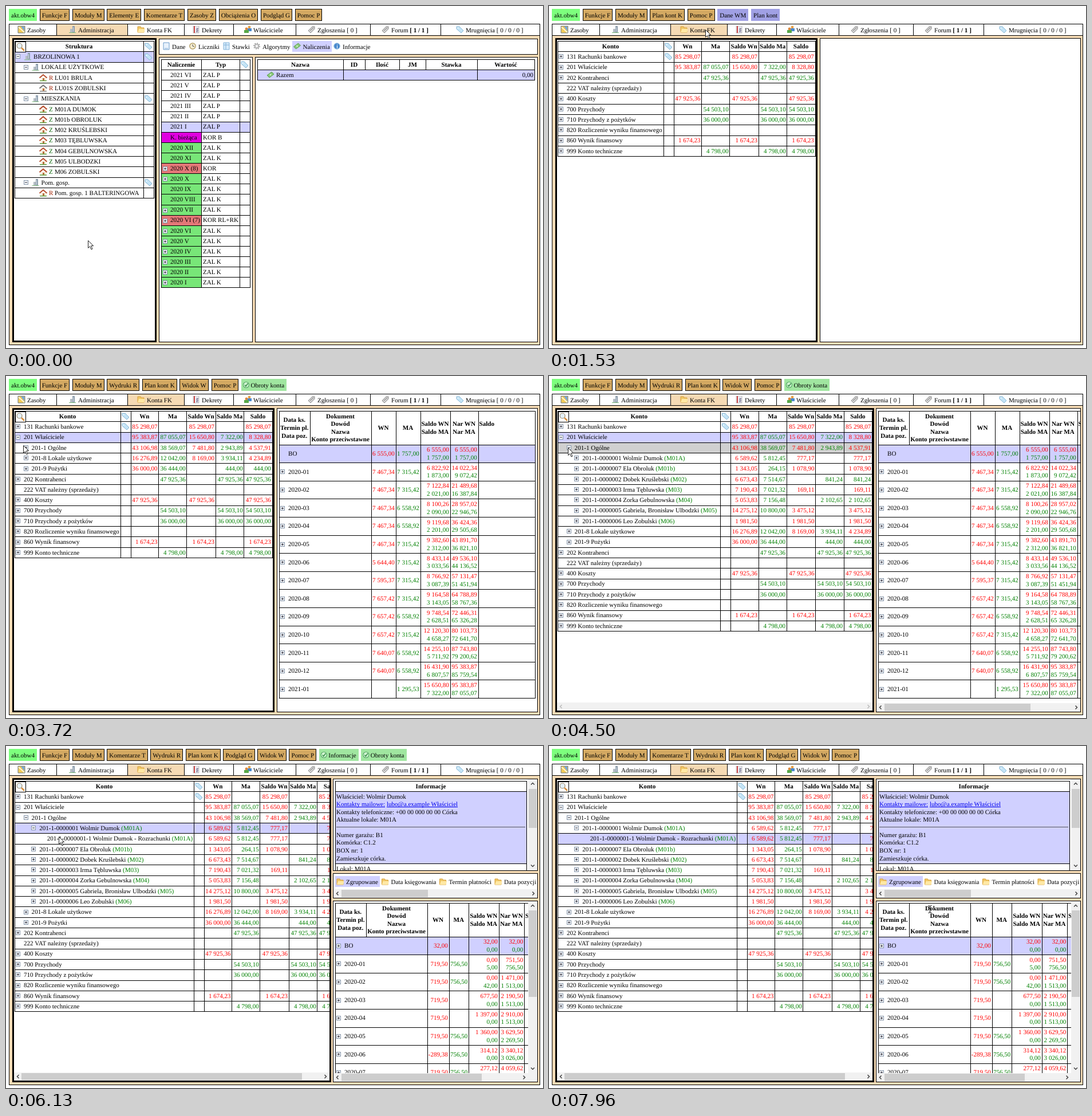
An HTML page with a canvas that plays this animation: 938x597 px, repeating every 8000 ms.

```html
<!DOCTYPE html>
<html lang="pl">
<head>
<meta charset="utf-8">
<title>Administracja</title>
<style>
html, body { margin: 0; width: 100%; height: 100%; overflow: hidden; background: #fff; }
canvas { display: block; }
</style>
</head>
<body>
<canvas width="938" height="597"></canvas>
<script>
const g = document.querySelector('canvas').getContext('2d');
const PEACH = '#f5dab4', TAN = '#d4a962', LILAC = '#d0d0ff', GRAY = '#d0d0d0';
const RED = '#f00', GREEN = '#008000';
const ROW = 18.29, LOOP = 8000;
const R = Math.round;

// --- drawing helpers ---
function font(bold) {
  g.font = (bold ? 'bold ' : '') + '11.07px "Liberation Serif", "Times New Roman", serif';
  g.textRendering = 'geometricPrecision';
}
function text(s, x, y, color = '#000', align = 'left', bold = false) {
  font(bold);
  g.fillStyle = color;
  g.textAlign = align;
  g.fillText(s, x, y + 3.7);
  return g.measureText(s).width;
}
const head = (s, x, y) => text(s, x, y, '#000', 'center', true);
function fill(x1, y1, x2, y2, color) {
  g.fillStyle = color;
  g.fillRect(R(x1), R(y1), R(x2) - R(x1), R(y2) - R(y1));
}
function box(x1, y1, x2, y2, color = '#fff', line = 1) {
  fill(x1, y1, x2 + 1, y2 + 1, '#000');
  fill(x1 + line, y1 + line, x2 + 1 - line, y2 + 1 - line, color);
}
const hline = (x1, x2, y) => fill(x1, R(y), x2 + 1, R(y) + 1, '#000');
const vline = (x, y1, y2) => fill(R(x), y1, R(x) + 1, y2 + 1, '#000');
function grid(xs, y, h, n) {
  for (let i = 0; i <= n; i++) hline(xs[0], xs[xs.length - 1], y + i * h);
  xs.forEach(x => vline(x, y, y + n * h));
}
function poly(x, y, pts, color, stroke) {
  g.beginPath();
  for (let i = 0; i < pts.length; i += 2) g.lineTo(x + pts[i], y + pts[i + 1]);
  g.closePath();
  if (color) { g.fillStyle = color; g.fill(); }
  if (stroke) { g.strokeStyle = stroke; g.lineWidth = 1; g.stroke(); }
}
function path(x, y, pts, color, width = 1) {
  g.beginPath();
  for (let i = 0; i < pts.length; i += 2) g.lineTo(x + pts[i], y + pts[i + 1]);
  g.strokeStyle = color; g.lineWidth = width; g.stroke();
}
function disc(x, y, r, color, stroke) {
  g.beginPath(); g.arc(x, y, r, 0, 7);
  if (color) { g.fillStyle = color; g.fill(); }
  if (stroke) { g.strokeStyle = stroke; g.lineWidth = 1.2; g.stroke(); }
}
function clip(x1, y1, x2, y2, draw) {
  g.save();
  g.beginPath(); g.rect(x1, y1, x2 - x1, y2 - y1); g.clip();
  draw();
  g.restore();
}

// --- icons, centred on x, y ---
const TAG = [-6, -5, -1, -5, 6, 2, 2, 6, -6, -1];
const SHEET = [-5, -6, 5, -6, 5, 6, -5, 6];
const icons = {
  tag(x, y) { poly(x, y, TAG, '#c4e4f6', '#86b6d6'); disc(x - 3.5, y - 2.5, 1, '#fff'); },
  clipTag(x, y) { poly(x, y, [-6, 2, 1, -5, 5, -5, 5, -1, -2, 6], '#d4d4d4', '#888'); path(x, y, [-3, 2, 3, -3], '#777'); },
  building(x, y) {
    fill(x - 4, y - 1, x, y + 5, '#b4bcc4');
    fill(x, y - 6, x + 4, y + 5, '#8c9cac');
    fill(x + 1, y - 4, x + 2, y + 4, '#dce6ee');
    path(x, y, [-6, 5.5, 6, 5.5], '#7ab87a');
  },
  folder(x, y) {
    poly(x, y, [-6, -5, -1, -5, 0, -3, 5, -3, 5, 5, -6, 5], '#f0c868', '#d8a038');
    poly(x, y, [-4, -1, 6.5, -1, 5, 5, -6, 5], '#ffe8a4');
  },
  book(x, y) { poly(x, y, SHEET, '#f4f4f8', '#bbb'); path(x, y, [-3, -6, -3, 6], '#c44', 2); path(x, y, [0, -2, 4, -2, 0, 1, 4, 1, 0, 4, 4, 4], '#668'); },
  people(x, y) {
    disc(x + 3, y - 4, 2.4, '#e8a048'); fill(x, y - 2, x + 7, y + 3, '#4888d0');
    disc(x - 2, y - 1, 2.4, '#d88840'); fill(x - 6, y + 1, x + 2, y + 6, '#58a848');
  },
  map(x, y) {
    poly(x, y, [-6, -6, 6, -6, 6, 6, -6, 6], '#f4cc58', '#678');
    poly(x, y, [-1, -5, 5, -5, 5, 3], '#78a8d8'); path(x, y, [-5, -4, 5, 5], '#fff', 1.5);
  },
  house(x, y, dim) {
    fill(x - 4, y, x + 5, y + 5, '#f6eedc');
    fill(x - 1, y + 1, x + 2, y + 5, '#b87040');
    path(x, y, [-6.5, 0.5, 0, -5, 6.5, 0.5], dim ? '#777' : '#b85030', 2);
    path(x, y, [-6, 5.5, 6, 5.5], dim ? '#888' : '#60a040', 1.5);
  },
  page(x, y) { poly(x, y, SHEET, '#e8f2fc', '#6898c8'); path(x, y, [-3, 4, 3, 4], '#88b0d8'); },
  clock(x, y) { disc(x, y, 5.2, '#f4ecd0', '#a89050'); path(x, y, [0, -3, 0, 0, 3, 1], '#555'); },
  sheet(x, y) { poly(x, y, SHEET, '#d8ecfa', '#80b0d8'); path(x, y, [-5, -2, 5, -2], '#80b0d8'); path(x, y, [-1, -6, -1, 6], '#80b0d8'); },
  gear(x, y) { g.setLineDash([2, 2]); disc(x, y, 5.2, '', '#888'); g.setLineDash([]); disc(x, y, 3.5, '#ddd', '#999'); disc(x, y, 1.3, '#fff'); },
  cash(x, y) { poly(x, y, [-6, 1, 2, -5, 6, -1, -2, 5], '#88c878', '#5a9c50'); disc(x, y, 1.6, '#c8ecc0'); },
  info(x, y) { disc(x, y, 5.2, '#4888cc', '#90b8e0'); fill(x - 0.5, y - 1, x + 1, y + 4, '#fff'); fill(x - 0.5, y - 3, x + 1, y - 2, '#fff'); },
  check(x, y) { disc(x, y, 5, '#d0f4d0', '#58a868'); path(x, y, [-2.5, 0, -0.5, 2.5, 3, -2.5], '#389048', 1.5); },
  hourglass(x, y) { poly(x, y, [-4, -5, 4, -5, -4, 5, 4, 5], '#f8f0c0', '#b09040'); path(x, y, [-5, -5.5, 5, -5.5], '#987838'); path(x, y, [-5, 5.5, 5, 5.5], '#987838'); }
};
function toggle(x, y, open) {
  x = R(x) - 4; y = R(y) - 4;
  fill(x, y, x + 8, y + 8, '#8494a8');
  fill(x + 1, y + 1, x + 7, y + 7, '#f6f8fa');
  path(x, y, [2, 4, 6, 4], '#223');
  if (!open) path(x, y, [4, 2, 4, 6], '#223');
}
function lens(y = 62) {
  box(16, y, 34, y + 18);
  path(25, y + 9, [2, 2, 7, 7], '#d89040', 2.5);
  disc(23.5, y + 7.5, 4.5, '#e4f0fa', '#9a8868');
}

// --- scrollbars ---
function arrow(x, y, dx, dy, color) {
  path(x, y, dx ? [-dx * 1.5, -3, dx * 1.5, 0, -dx * 1.5, 3] : [-3, -dy * 1.5, 0, dy * 1.5, 3, -dy * 1.5], color, 1.5);
}
function hbar(x1, x2, y1, y2, from, to) {
  fill(x1, y1, x2, y2, '#f1f1f1');
  if (to) fill(from, y1 + 1, to, y2 - 1, '#cdcdcd');
  arrow(x1 + 7, (y1 + y2) / 2, -1, 0, to ? '#444' : '#bbb');
  arrow(x2 - 7, (y1 + y2) / 2, 1, 0, to ? '#444' : '#bbb');
}
function vbar(x1, x2, y1, y2, from, to) {
  fill(x1, y1, x2, y2, '#f1f1f1');
  fill(x1 + 1, from, x2 - 1, to, '#cdcdcd');
  arrow((x1 + x2) / 2, y1 + 8, 0, -1, '#444');
  arrow((x1 + x2) / 2, y2 - 8, 0, 1, '#444');
}

// --- top bar and tabs ---
const BADGE = { y: ['#e4e4a0', 'hourglass'], g: ['#a0e6a0', 'check'], p: ['#a0a0e4'] };
const MENUS = [
  [0, 'Funkcje F,Moduły M,Elementy E,Komentarze T,Zasoby Z,Obciążenia O,Podgląd G,Pomoc P'],
  [1380, 'Funkcje F,Moduły M,Plan kont K,Pomoc P'],
  [3640, 'Funkcje F,Moduły M,Wydruki R,Plan kont K,Widok W,Pomoc P'],
  [5800, 'Funkcje F,Moduły M,Komentarze T,Wydruki R,Plan kont K,Podgląd G,Widok W,Pomoc P']
];
const BADGES = [
  [0, ''], [1380, 'yDane WM,yPlan kont'], [1530, 'pDane WM,pPlan kont'], [2900, ''],
  [3410, 'yObroty konta'], [3640, 'gObroty konta'],
  [4650, 'yObroty konta,gObroty konta'], [4960, 'gObroty konta'],
  [5340, 'yInformacje,yObroty konta,gObroty konta'], [5800, 'gInformacje,gObroty konta'],
  [6200, 'yInformacje,yObroty konta,gInformacje,gObroty konta'],
  [6430, 'pInformacje,gObroty konta,gInformacje,gObroty konta'],
  [7050, 'pInformacje,gObroty konta'], [7890, '']
];
const at = (list, t) => list.filter(e => e[0] <= t).pop()[1];

function topBar(t) {
  let x = 5;
  const button = (s, color, framed, icon) => {
    font();
    const pad = icon ? 16.5 : 4.1, w = g.measureText(s).width + pad + 4.1;
    if (framed) box(R(x), 5, R(x + w) - 1, 25, color);
    else fill(x, 5, x + w, 26, color);
    if (icon) icons[icon](x + 8.5, 15.5);
    text(s, x + pad, 16);
    x += w + 4.5;
  };
  button('akt.obw4', '#7dff7d');
  at(MENUS, t).split(',').forEach(s => button(s, TAN, true));
  const badges = at(BADGES, t);
  if (badges) badges.split(',').forEach(s => button(s.slice(1), BADGE[s[0]][0], false, BADGE[s[0]][1]));
}
const TABS = [
  [5, 37, 'map', 'Zasoby'], [88, 126, 'building', 'Administracja'], [212, 246, 'folder', 'Konta FK'],
  [311, 342, 'book', 'Dekrety'], [397, 432, 'people', 'Właściciele'], [506, 544, 'clipTag', 'Zgłoszenia [ 0 ]'],
  [636, 673, 'clipTag', 'Forum '], [759, 803, 'tag', 'Mrugnięcia [ 0 / 0 / 0 ]']
];
function tabs(active) {
  box(5, 51, 932, 591, PEACH);
  TABS.forEach(([x, tx, icon, s], i) => {
    box(x, 31, i < 7 ? TABS[i + 1][0] : 932, 51, i === active ? PEACH : '#fff');
    icons[icon](tx - 10, 41);
    const w = text(s, tx, 42);
    if (i === 6) text('[ 1 / 1 ]', tx + w, 42, '#000', 'left', true);
  });
}

// --- administration view ---
const TREE = [
  '0||BRZOLINOWA 1|t', '1||LOKALE UŻYTKOWE', '2|R|LU01 BRULA', '2|R|LU01S ZOBULSKI', '1||MIESZKANIA|t',
  '2|Z|M01A DUMOK', '2|Z|M01b OBROLUK', '2|Z|M02 KRUŚLEBSKI', '2|Z|M03 TĘBLUWSKA', '2|Z|M04 GEBULNOWSKA',
  '2|Z|M05 ULBODZKI', '2|Z|M06 ZOBULSKI', '1||Pom. gosp.|t', '2|R|Pom. gosp. 1 BALTERINGOWA'
];
const PERIODS = ('w2021 VI:ZAL P,w2021 V:ZAL P,w2021 IV:ZAL P,w2021 III:ZAL P,w2021 II:ZAL P,p2021 I:ZAL P,' +
  'mK. bieżąca:KOR B,g2020 XII:ZAL K,g2020 XI:ZAL K,r2020 X (8):KOR,G2020 X:ZAL K,g2020 IX:ZAL K,' +
  'g2020 VIII:ZAL K,G2020 VII:ZAL K,r2020 VI (7):KOR RL+RK,G2020 VI:ZAL K,G2020 V:ZAL K,G2020 IV:ZAL K,' +
  'G2020 III:ZAL K,G2020 II:ZAL K,G2020 I:ZAL K').split(',');
const PERIOD_FILL = { w: '#fff', p: LILAC, m: '#e000e0', g: '#78e678', G: '#78e678', r: '#e47878' };

function adminView() {
  box(11, 56, 262, 586, '#fff', 3);
  fill(15, 61 + ROW, 258, 61 + 2 * ROW, LILAC);
  grid([15, 240, 258], 61, ROW, 15);
  head('Struktura', 127.5, 70);
  icons.tag(249, 70);
  lens();
  TREE.forEach((row, i) => {
    const [level, kind, name, tag] = row.split('|'), y = 61 + ROW * (i + 1.5), dx = level * 13.5;
    if (kind) {
      icons.house(65, y, name.startsWith('LU01S'));
      text(kind, 75, y, kind === 'R' ? '#a02000' : '#006000');
      text(name, 85, y);
    } else {
      toggle(21 + dx, y, true);
      icons.building(38 + dx, y);
      text(name, 48 + dx, y);
    }
    if (tag) icons.tag(249, y);
  });

  box(267, 57, 928, 84);
  fill(500, 61, 569, 80, LILAC);
  [['page', 290, 'Dane'], ['clock', 336, 'Liczniki'], ['sheet', 395, 'Stawki'], ['gear', 448, 'Algorytmy'],
   ['cash', 518.5, 'Naliczenia'], ['info', 588, 'Informacje']].forEach(([icon, x, s]) => {
    icons[icon](x - 10, 70);
    text(s, x, 71);
  });

  box(267, 89, 430, 586);
  const h = 18.11;
  PERIODS.forEach((p, i) => {
    const y = 93 + h * (i + 1), [name, type] = p.slice(1).split(':');
    fill(271, y, p[0] === 'p' ? 426 : 341, y + h, PERIOD_FILL[p[0]]);
    if ('Gr'.includes(p[0])) toggle(278, y + h / 2 + 1);
    text(name, 287, y + h / 2);
    text(type, 344, y + h / 2);
  });
  grid([271, 341, 408, 426], 93, h, 22);
  head('Naliczenie', 306, 102);
  head('Typ', 375, 102);
  icons.tag(417, 102);

  box(435, 89, 928, 586);
  const xs = [439, 589, 627, 687, 733, 823, 923];
  fill(439, 111, 923, 129, LILAC);
  grid(xs, 93, 18, 1);
  grid([439, 589, 823, 923], 111, 18, 1);
  ['Nazwa', 'ID', 'Ilość', 'JM', 'Stawka', 'Wartość'].forEach((s, i) => head(s, (xs[i] + xs[i + 1]) / 2, 102));
  icons.cash(462, 120);
  text('Razem', 472, 120.5);
  text('0,00', 921, 120, '#000', 'right');
}

// --- chart of accounts: level, name, flat, debit, credit, debit balance ---
const ACCOUNTS = [
  [0, '131 Rachunki bankowe', '', 85298.07, 0],
  [0, '201 Właściciele', '', 95383.87, 87055.07, 15650.8],
  [1, '201-1 Ogólne', '', 43106.98, 38569.07, 7481.8],
  [2, '201-1-0000001 Wolmir Dumok', 'M01A', 6589.62, 5812.45],
  [3, '201-1-0000001-1 Wolmir Dumok - Rozrachunki', 'M01A', 6589.62, 5812.45],
  [2, '201-1-0000007 Ela Obroluk', 'M01b', 1343.05, 264.15],
  [2, '201-1-0000002 Dobek Kruślebski', 'M02', 6673.43, 7514.67],
  [2, '201-1-0000003 Irma Tębluwska', 'M03', 7190.43, 7021.32],
  [2, '201-1-0000004 Zorka Gebulnowska', 'M04', 5053.83, 7156.48],
  [2, '201-1-0000005 Gabriela, Bronisław Ulbodzki', 'M05', 14275.12, 10800],
  [2, '201-1-0000006 Leo Zobulski', 'M06', 1981.5, 0],
  [1, '201-8 Lokale użytkowe', '', 16276.89, 12042, 8169],
  [1, '201-9 Pożytki', '', 36000, 36444],
  [0, '202 Kontrahenci', '', 0, 47925.36],
  [0, '222 VAT należny (sprzedaży)', '', 0, 0],
  [0, '400 Koszty', '', 47925.36, 0],
  [0, '700 Przychody', '', 0, 54503.1],
  [0, '710 Przychody z pożytków', '', 0, 36000],
  [0, '820 Rozliczenie wyniku finansowego', '', 0, 0],
  [0, '860 Wynik finansowy', '', 1674.23, 0],
  [0, '999 Konto techniczne', '', 0, 4798]
];
// moments at which the next account on the branch is clicked, then loaded
const CLICKED = [3240, 4420, 5340, 6200], LOADED = [3640, 4960, 5800, 6430];
const passed = (list, t) => list.filter(v => v <= t).length;

function money(v) {
  const [whole, cents] = Math.abs(v).toFixed(2).split('.');
  return (v < 0 ? '-' : '') + whole.replace(/\B(?=(\d{3})+$)/g, ' ') + ',' + cents;
}
function amount(v, x, y, color, zero) {
  if (zero || Math.abs(v) > 0.004) text(money(v), x - 1.7, y, color, 'right');
}
function accountsView(t) {
  const clicked = passed(CLICKED, t), loaded = passed(LOADED, t), open = Math.min(clicked, 3);
  const end = [200, 200, 299.4, 328][open], right = open < 2 ? 468 : 567;
  const xs = [15, ...[0, 17.5, 66.3, 115.4, 165.8, 215.4, 264.6].map(d => end + d)];
  const rows = ACCOUNTS.filter(a => a[0] <= open);
  box(11, 56, right, 586, '#fff', 3);
  clip(14, 59, right - 2, 584, () => {
    rows.forEach((a, i) => {
      const [level, name, flat, wn, ma, debit = Math.max(0, wn - ma)] = a;
      const top = 61 + ROW * (i + 1), y = top + ROW / 2, dx = level * 13.6, diff = wn - ma;
      if (i && i === loaded) fill(15, top, xs[7], top + ROW, LILAC);
      else if (i && i === clicked) fill(15, top, xs[7], top + ROW, GRAY);
      if (level < 3 && !name.startsWith('222')) toggle(21 + dx, y, i + 1 < rows.length && rows[i + 1][0] > level);
      const w = text(name, 31 + dx, y);
      if (flat) text(`(${flat})`, 33.8 + dx + w, y, GREEN);
      amount(wn, xs[3], y, RED);
      amount(ma, xs[4], y, GREEN);
      amount(debit, xs[5], y, RED);
      amount(debit - diff, xs[6], y, GREEN);
      amount(Math.abs(diff), xs[7], y, diff > 0 ? RED : GREEN);
    });
    grid(xs, 61, ROW, rows.length + 1);
    ['Konto', '', 'Wn', 'Ma', 'Saldo Wn', 'Saldo Ma', 'Saldo'].forEach((s, i) => head(s, (xs[i] + xs[i + 1]) / 2, 70));
    icons.tag(end + 9, 70);
    icons.tag(end + 9, 88);
    if (t > 2000) lens();
    if (open === 2) hbar(14, 565, 570, 584);
    if (open === 3) hbar(14, 565, 570, 584, 27, 517);
  });
}

// --- monthly turnover; big and small credits follow one yearly pattern ---
const rep = (v, n) => Array(n).fill(v);
const credits = (first, big, small, last) => [first, ...[...'BBSSBBBBSBSS'].map(k => k === 'B' ? big : small), last];
const BOOKS = [
  {
    wn: [6555, ...rep(7467.34, 5), 5644.4, 7595.37, ...rep(7657.42, 3), 7640.07, 7640.07, 0],
    ma: credits(1757, 7315.42, 6558.92, 1295.53),
    saldo: [1757, 1873, 2021, 2090, 2201, 2312, 3033.56, 3087.39, 3143.05, 2628.51, 4658.27, 5711.92, 6807.57, 7322]
  },
  {
    wn: [6555, ...rep(3107.99, 5), 1375.26, 3226.87, ...rep(3288.92, 3), 3271.57, 3271.57, 0],
    ma: credits(1715, 3278.42, 2521.92, 1295.53),
    saldo: [1715, 1794, 1905, 1937, 2011, 2085, 2769.56, 2786.39, 2805.05, 2253.51, 2312.16, 2370.81, 2429.46, 2943.89]
  },
  { wn: [32, ...rep(719.5, 5), -289.38, 719.5], ma: credits(0, 756.5, 0, 0) }
];
const WIDE = [0, 53.5, 160.5, 203.5, 246.5, 298.5, 347.5, 447];
const SLIM = [0, 53.5, 160.5, 198.5, 233, 285.5, 330, 430];

function ledger(x, y, cols, book) {
  const xs = cols.map(d => x + d), h = 31.6, y0 = y + 58.5;
  const heads = ['Data ks.|Termin pl.|Data poz.', 'Dokument|Dowód|Nazwa|Konto przeciwstawne', 'WN', 'MA', 'Saldo WN|Saldo MA', 'Nar WN|Nar MA'];
  heads.forEach((s, i) => {
    const lines = s.split('|');
    lines.forEach((line, k) => head(line, (xs[i] + xs[i + 1]) / 2, y + 29.2 + (k - (lines.length - 1) / 2) * 13.6));
  });
  text('Saldo', xs[6] + 2, y + 22.4, '#000', 'left', true);
  fill(x, y0, xs[7], y0 + h, LILAC);
  let wn = 0, ma = 0;
  book.wn.forEach((v, i) => {
    const c = y0 + h * (i + 0.5);
    wn += v;
    ma += book.ma[i];
    const credit = book.saldo ? book.saldo[i] : Math.max(0, ma - wn);
    if (i || !book.saldo) toggle(x + 6, c + 0.5);
    text(i ? i > 12 ? '2021-01' : '2020-' + String(i).padStart(2, '0') : 'BO', x + 16, c);
    amount(v, xs[3], c, RED);
    amount(book.ma[i], xs[4], c, GREEN);
    amount(credit + wn - ma, xs[5], c - 6.8, RED, true);
    amount(credit, xs[5], c + 6.8, GREEN, true);
    amount(wn, xs[6], c - 6.8, RED, true);
    amount(ma, xs[6], c + 6.8, GREEN, true);
  });
  grid(xs, y, 58.5, 1);
  grid([xs[0], ...xs.slice(2)], y0, h, book.wn.length);
}

function infoPanels() {
  box(571, 57, 928, 217);
  clip(572, 58, 928, 217, () => {
    fill(575, 79, 909, 205, LILAC);
    grid([575, 909], 61, 18, 1);
    grid([575, 909], 79, 126, 2);
    head('Informacje', 742, 70);
    text('Właściciel: Wolmir Dumok', 577, 88);
    let x = 577;
    ['Kontakty mailowe:', 'lubo@a.example Właściciel'].forEach(s => {
      const w = text(s, x, 101.5, '#00e');
      fill(x, 106, x + w, 107, '#00e');
      x += w + 2.8;
    });
    text('Kontakty telefoniczne: +00 00 000 00 00 Córka', 577, 115);
    text('Aktualne lokale: M01A', 577, 128.5);
    fill(577, 141, 907, 142, '#555');
    ['Numer garażu: B1', 'Komórka: C1.2', 'BOX nr: 1', 'Zamieszkuje córka.'].forEach((s, i) => text(s, 577, 155 + i * 13.6));
    text('Lokal: M01A', 577, 214);
    vbar(912, 928, 58, 217, 75, 143);
  });

  box(571, 222, 928, 265);
  clip(572, 223, 928, 265, () => {
    fill(575, 227, 653, 246, LILAC);
    [[594, 'Zgrupowane'], [672.5, 'Data księgowania'], [773.5, 'Termin płatności'], [870, 'Data pozycji']].forEach(([x, s]) => {
      icons.folder(x - 10, 237);
      text(s, x, 237.5);
    });
    hbar(572, 928, 250, 265, 586, 737);
  });

  box(571, 270, 928, 586);
  clip(572, 271, 912, 571, () => ledger(575, 274, SLIM, BOOKS[2]));
  vbar(912, 928, 271, 571, 287, 438);
  fill(912, 571, 928, 586, '#f1f1f1');
  hbar(572, 912, 571, 586, 586, 831);
}

function rightSide(t) {
  if (t >= LOADED[2]) return infoPanels();
  const x = t < CLICKED[1] ? 473 : 571;
  box(x, 56, 928, 586);
  if (t < LOADED[0]) return;
  clip(x + 1, 57, 928, 586, () => {
    ledger(x + 4, 61, WIDE, BOOKS[t < LOADED[1] ? 0 : 1]);
    if (x > 500) hbar(572, 928, 571, 586, 586, 841);
  });
}

// --- pointer: time, x, y ---
const MOVES = [
  [10, 143, 409], [840, 271, 64], [1000, 265, 52], [1150, 273, 41], [1860, 273, 41], [2630, 24, 114],
  [2700, 24, 114], [2900, 12, 110], [3170, 22, 107], [3330, 22, 107], [3870, 32, 124], [4420, 33, 125],
  [4580, 33, 125], [5190, 50, 145], [5440, 50, 145], [6280, 96, 159], [6660, 96, 159], [6820, 101, 159],
  [7200, 101, 159], [7580, 586, 383], [7660, 580, 373], [7800, 580, 373], [7960, 665, 284]
];
function pointer(t) {
  const n = MOVES.findIndex(m => m[0] > t);
  const b = MOVES[n < 0 ? MOVES.length - 1 : n], a = n > 0 ? MOVES[n - 1] : b;
  const k = a === b ? 0 : (t - a[0]) / (b[0] - a[0]), e = k * k * (3 - 2 * k);
  const x = R(a[1] + (b[1] - a[1]) * e) + 0.5, y = R(a[2] + (b[2] - a[2]) * e) + 0.5;
  if (t >= 7890) {
    path(x, y, [-3, -6, 0, -5, 0, 6, -3, 7], '#000');
    path(x, y, [3, -6, 0, -5, 0, 6, 3, 7], '#000');
  } else {
    poly(x, y, [0, 0, 0, 13, 3, 10, 5.5, 15.5, 7.5, 14.5, 5.2, 9.2, 9.2, 9.2], '#fff', '#222');
  }
}

function draw(t) {
  fill(0, 0, 938, 597, '#fff');
  topBar(t);
  tabs(t < 1380 ? 1 : 2);
  if (t < 1380) adminView();
  else {
    accountsView(t);
    rightSide(t);
  }
  pointer(t);
}
const start = performance.now();
function tick() {
  draw((performance.now() - start) % LOOP);
  requestAnimationFrame(tick);
}
tick();
</script>
</body>
</html>
```
